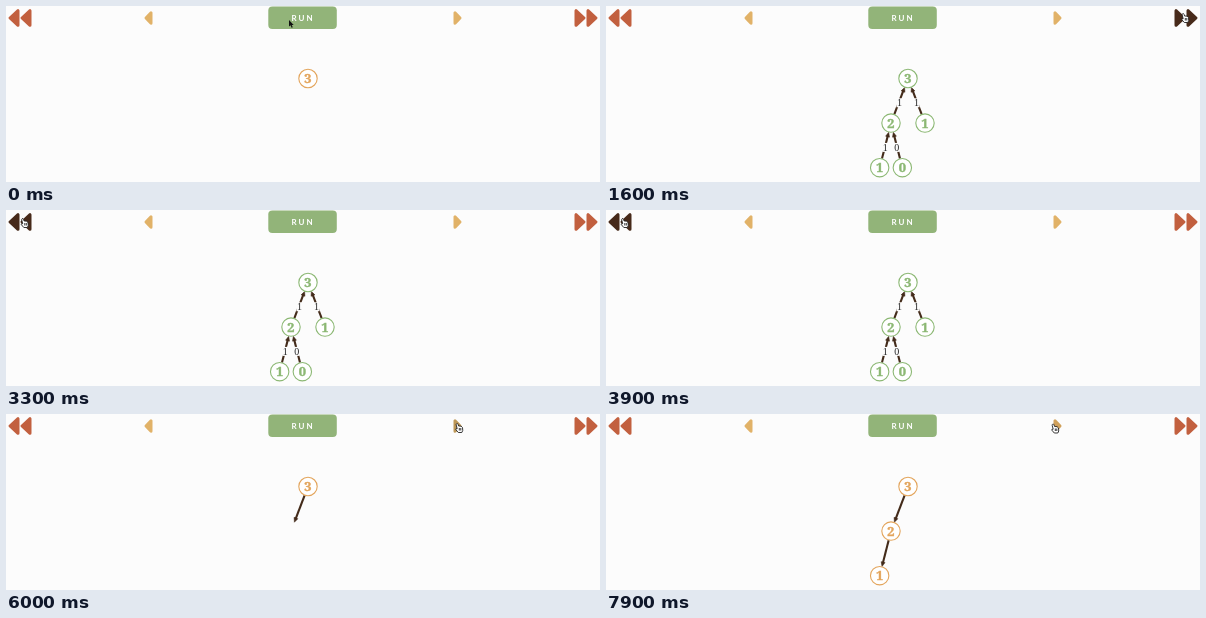
An HTML page that plays this animation: 594 by 176 pixels, repeating every 8000 ms.

```html
<!DOCTYPE html>
<html lang="en">
<head>
<meta charset="utf-8">
<style>
html, body { margin: 0; width: 100%; height: 100%; overflow: hidden; background: #fcfcfc; }
svg { display: block; }
text { text-anchor: middle; }
.run { font: bold 8px Lato, sans-serif; letter-spacing: 2px; fill: #fff; }
.node { font: bold 13px "Noto Serif", serif; }
.node circle { fill: #fff; stroke-width: 1.1; }
.node text { stroke-width: .4; }
.tri { stroke-width: 3; stroke-linejoin: round; }
.edge { stroke: #432b1a; fill: #432b1a; stroke-width: 2.1; }
.edge .head { stroke-width: .5; }
.label { font: 10px "Liberation Serif", serif; fill: #222; }
</style>
</head>
<body>
<svg width="594" height="176" viewBox="0 0 594 176">
  <rect x="262.300" y=".5" width="68.500" height="22.500" rx="4" fill="#92b479"/>
  <text class="run" x="297" y="14.500">RUN</text>
  <g id="scene"></g>
  <path id="arrow" d="M0 0V6.600L1.500 5.300L2.600 7.800L3.800 7.300L2.700 4.900H4.700Z" fill="#111"/>
  <path id="hand" d="M1.500 .8Q2.600 0 3 1.300L3.600 3Q6.500 2.500 7.500 4.500Q8.300 8 6.800 9.500H3.300L.8 6.600Q.4 5.400 2.200 5.700L1.200 2Q1 1.200 1.500 .8ZM4.300 5V7.500M5.800 5V7.500" fill="#fff" stroke="#222" stroke-width=".9"/>
</svg>
<script>
const LOOP = 8000, STEP = 100;
const RED = "#c2603f", GOLD = "#e1b268", DARK = "#472a1a", ORANGE = "#e3a55c", GREEN = "#8cb874";
const $ = id => document.getElementById(id);
const within = (t, a, b) => t >= a && t < b;

// Pointer moves: start, duration, end point
const moves = [
  [700, 300, 552, 10], [1000, 300, 575, 7], [2250, 500, 417, 20], [2900, 200, 14.5, 8],
  [4200, 780, 449, 9], [7800, 100, 445, 9.5]
];

function pointer(t) {
  let x = 283, y = 14;
  for (const [start, span, x1, y1] of moves) {
    const k = Math.min(1, Math.max(0, (t - start) / span)), e = k * k * (3 - 2 * k);
    const sag = Math.abs(x1 - x) / 70 * Math.sin(Math.PI * k);
    x += (x1 - x) * e;
    y += (y1 - y) * e + sag;
    if (k < 1) break;
  }
  return `translate(${x} ${y})`;
}

// Call tree of fib(n), each level two thirds as wide as the one above
const calls = [];
function call(n, x, y, spread, parent) {
  const node = { n, x, y, parent, value: n < 2 ? n : 0 };
  calls.push(node);
  if (n > 1)
    for (const k of [1, 2])
      node.value += call(n - k, x + (2 * k - 3) * spread, y + 44.6, spread * 2 / 3, node).value;
  return node;
}
call(3, 302, 72.5, 17);

const circle = ({ x, y, n }, color) =>
  `<g class="node" fill="${color}" stroke="${color}"><circle cx="${x}" cy="${y}" r="9.2"/>` +
  `<text x="${x}" y="${y + 4.7}">${n}</text></g>`;

function edge(a, b) {
  const dx = b.x - a.x, dy = b.y - a.y, len = Math.hypot(dx, dy) - 9.5;
  return `<g class="edge" transform="translate(${a.x} ${a.y}) rotate(${Math.atan2(dy, dx) * 180 / Math.PI})">` +
    `<path d="M9.5 0H${len - 3}"/><path class="head" d="M${len} 0l-4.5 -2v4Z"/></g>`;
}

function result({ x, y, parent, value }) {
  const cx = (x + parent.x) / 2, cy = (y + parent.y) / 2 + 2;
  return `<rect x="${cx - 3}" y="${cy - 4.5}" width="6" height="9" fill="#fcfcfc"/>` +
    `<text class="label" x="${cx}" y="${cy + 3.3}">${value}</text>`;
}

function tree(t) {
  let edges = "", circles = "";
  const done = within(t, 1500, 4000);
  calls.forEach((c, i) => {
    // Stepping draws an edge, then its node
    const edgeAt = 5000 + 1000 * i, nodeAt = 5200 + 1200 * i;
    if (c.parent && done) edges += edge(c, c.parent) + result(c);
    else if (c.parent && t >= edgeAt) edges += edge(c.parent, c);
    if (done || !c.parent || t >= nodeAt) circles += circle(c, done ? GREEN : ORANGE);
  });
  return edges + circles;
}

const triangle = (tip, dir, w, h, color) =>
  `<path class="tri" fill="${color}" stroke="${color}" d="M${tip + 2 * dir} 12l${dir * w} ${-h}v${2 * h}Z"/>`;

function controls(t) {
  const rewind = within(t, 3300, 4300) ? DARK : RED;
  const skip = within(t, 1300, 2300) ? DARK : RED;
  const next = t < 5200 ? GOLD : t < 6400 ? "#bd9757" : "#d0a05a";
  return triangle(2, 1, 8, 7.3, rewind) + triangle(14, 1, 8, 7.3, rewind) +
    triangle(138, 1, 5, 5.2, GOLD) + triangle(456, -1, 5, 5.2, next) +
    triangle(580, -1, 8, 7.3, skip) + triangle(592, -1, 8, 7.3, skip);
}

let last = -1;
function draw(now) {
  const t = Math.floor(now % LOOP / STEP) * STEP;
  if (t !== last) {
    last = t;
    $("scene").innerHTML = controls(t) + tree(t);
    const hand = within(t, 1300, 2300) || within(t, 3300, 4300) || t >= 5200;
    for (const id of ["hand", "arrow"]) {
      $(id).setAttribute("transform", pointer(t));
      $(id).style.display = (id === "hand") === hand ? "" : "none";
    }
  }
  requestAnimationFrame(draw);
}
draw(0);
</script>
</body>
</html>
```
